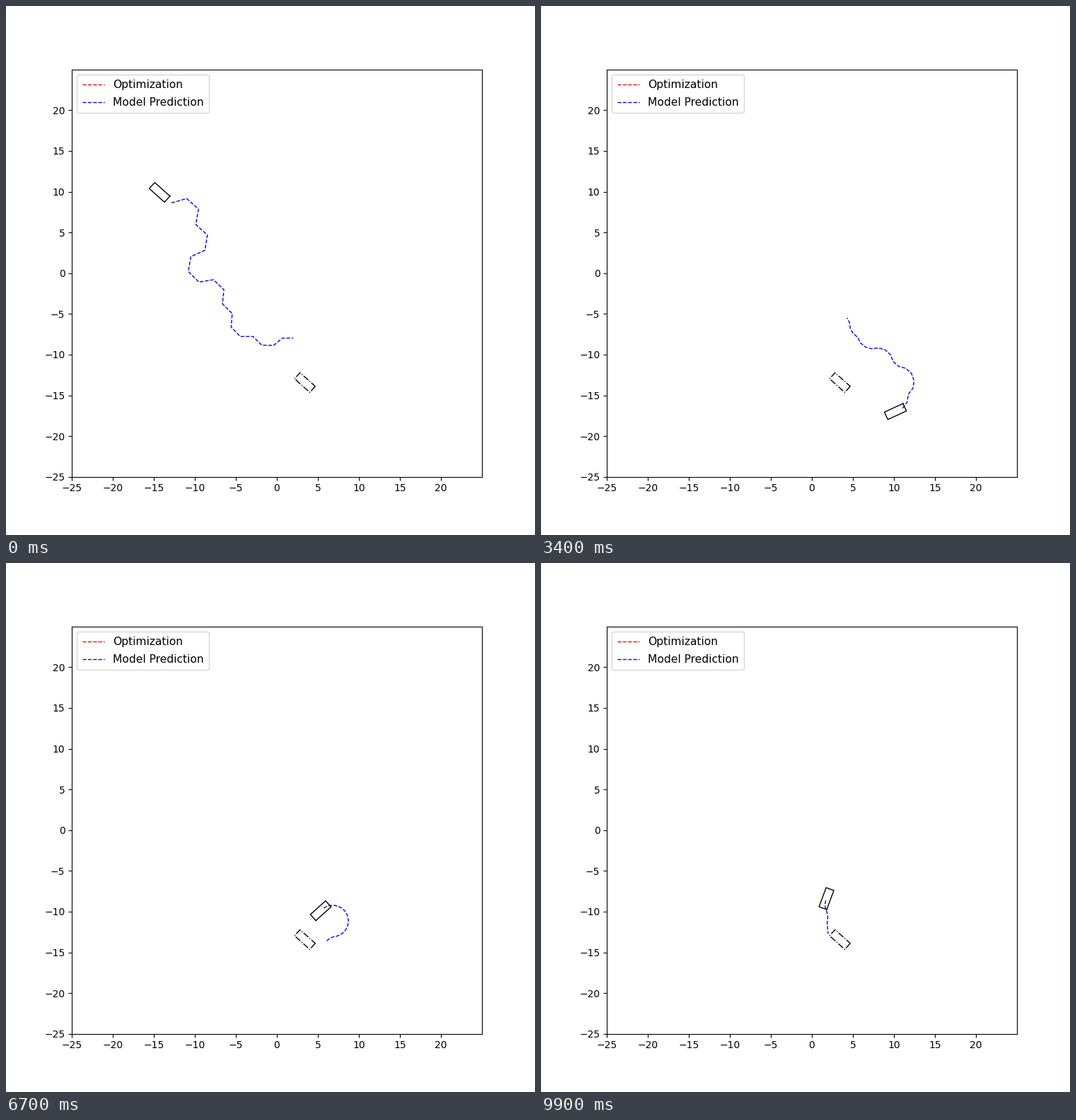
These frames come from a looping animation (748 px wide and 748 px high, 10000 ms). A matplotlib script:

```python
import numpy as np
import matplotlib.pyplot as plt
from matplotlib.animation import FuncAnimation

FRAMES = 100
HORIZON = 20
BEAM = 200
CAR = (2.5, 1.0)
TURN = np.radians(30)  # heading change per unit travelled at full lock

# time step, x, y, mean heading in degrees
ROUTE = np.array([
    (0, -14.30, 9.92, -13), (9, -1.21, 5.81, -16), (20, 8.68, -2.50, -89),
    (34, 10.19, -16.99, 39), (44, 6.18, -12.52, 190), (59, 2.69, -10.66, 218),
    (76, 7.78, -9.40, 211), (88, 2.13, -9.75, 232), (99, 1.78, -8.40, 246),
])

# Points that the plan aims to pass at a few moments
AIMS = {
    0: [(-9.9, 5.9), (-10.7, 0.1), (-6.3, -4.1), (-2.3, -8.3), (2.6, -8.7)],
    9: [(1.0, 2.5), (-1.8, -2.1), (-0.3, -7.3), (1.0, -12.4), (4.6, -13.6)],
    20: [(7.3, -7.0), (3.9, -9.7), (5.1, -13.6), (8.3, -13.5), (7.7, -10.9)],
    34: [(11.2, -13.7), (9.3, -10.5), (6.1, -8.5), (4.4, -5.8)],
    59: [(5.8, -10.5), (6.6, -13.5), (7.7, -15.8)],
    76: [(6.2, -11.0), (4.2, -11.9), (2.4, -12.4)],
    99: [(1.8, -10.4), (2.0, -13.0)],
}


def smooth(t, knots, values):
    """Cubic Hermite curve through values at the given knots."""
    slopes = np.gradient(values, knots, axis=0)
    k = np.clip(np.searchsorted(knots, t, "right") - 1, 0, len(knots) - 2)
    width = (knots[k + 1] - knots[k])[..., None]
    u = (t - knots[k])[..., None] / width
    return ((1 + 2 * u) * (1 - u) ** 2 * values[k]
            + u * (1 - u) ** 2 * width * slopes[k]
            + u ** 2 * (3 - 2 * u) * values[k + 1]
            + u ** 2 * (u - 1) * width * slopes[k + 1])


def speed(t):
    return 1.94 * np.exp(-t / 48)


def pose(t):
    """Car position and heading; the steering flips on every step."""
    x, y, mean = smooth(np.float64(t), ROUTE[:, 0], ROUTE[:, 1:])
    swing = TURN * speed(t) / 2
    return np.array([x, y]), np.radians(mean) - swing * (-1) ** t


def guide(t):
    """Aim curve relative to the car at one of the key moments."""
    start = pose(t)[0]
    pts = np.vstack([start, AIMS[t]])
    s = np.arange(1, HORIZON + 1) / HORIZON
    return smooth(s, np.linspace(0, 1, len(pts)), pts) - start


MOMENTS = list(AIMS)
GUIDES = [guide(t) for t in MOMENTS]


def prediction(t):
    """Beam search over left/right steering that stays near the aim curve."""
    k = min(np.searchsorted(MOMENTS, t, "right"), len(MOMENTS) - 1)
    u = (t - MOMENTS[k - 1]) / (MOMENTS[k] - MOMENTS[k - 1])
    start, heading = pose(t)
    aim = start + (1 - u) * GUIDES[k - 1] + u * GUIDES[k]

    forward = np.array([np.cos(heading), np.sin(heading)])
    if (aim[2] - start) @ forward < 0:
        heading += np.pi
    s = np.arange(HORIZON) / HORIZON
    steps = speed(t) * (1 - 0.35 * s ** 2)

    h, cost, paths = np.array([heading]), np.zeros(1), start[None, None]
    for i, step in enumerate(steps):
        if i:
            h = np.concatenate([h - TURN * step, h + TURN * step])
            cost, paths = np.tile(cost, 2), np.tile(paths, (2, 1, 1))
        move = step * np.stack([np.cos(h), np.sin(h)], axis=1)
        end = paths[:, -1] + move
        cost = cost + ((end - aim[i]) ** 2).sum(axis=1)
        best = np.argsort(cost, kind="stable")[:BEAM]
        h, cost = h[best], cost[best]
        paths = np.concatenate([paths[best], end[best][:, None]], axis=1)
    return paths[0, 1:].T


def box(center, a):
    u = np.array([1, 1, -1, -1, 1]) * CAR[0] / 2
    v = np.array([1, -1, -1, 1, 1]) * CAR[1] / 2
    return (center[0] + u * np.cos(a) - v * np.sin(a),
            center[1] + u * np.sin(a) + v * np.cos(a))


fig, ax = plt.subplots(figsize=(7.48, 7.48), dpi=100)
fig.subplots_adjust(left=0.1245, right=0.8995)
ax.set(xlim=(-25, 25), ylim=(-25, 25),
       xticks=np.arange(-25, 25, 5), yticks=np.arange(-25, 25, 5))
ax.plot([], [], "r--", lw=1, label="Optimization")
path, = ax.plot([], [], "b--", lw=1, label="Model Prediction")
car, = ax.plot([], [], "k-", lw=1)
ax.plot(*box((3.42, -13.43), np.radians(-42)), "k-.", lw=1)
ax.legend(loc="upper left", fontsize=11.2, labelspacing=0.63,
          borderpad=0.48, borderaxespad=0.45)


def update(t):
    car.set_data(*box(*pose(t)))
    path.set_data(*prediction(t))
    return car, path


anim = FuncAnimation(fig, update, frames=FRAMES, interval=100,
                     repeat=True, repeat_delay=0)
plt.show()
```
